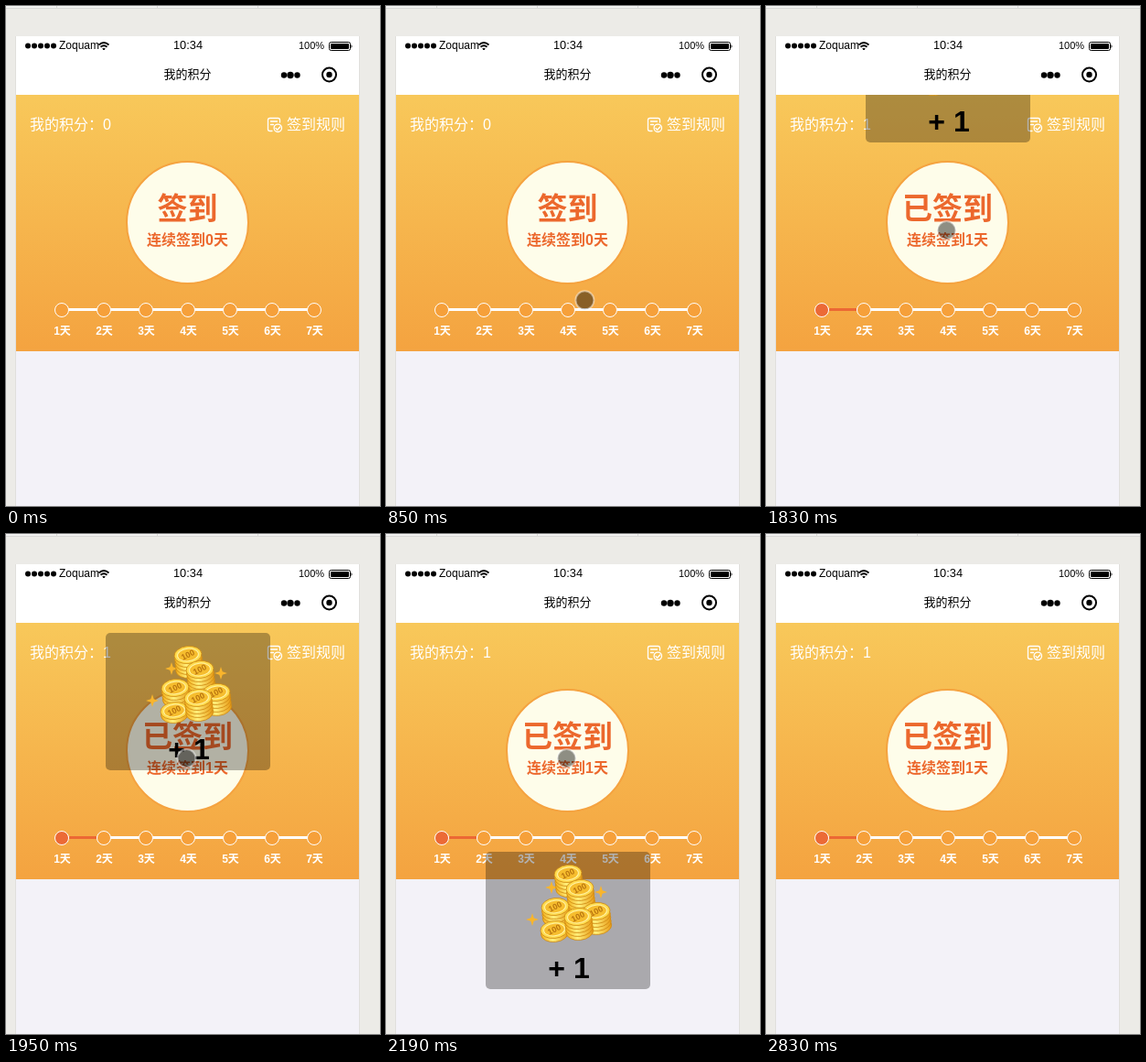
Animation, 409 px wide and 546 px high, one loop 4820 ms. Source, as an HTML page:

```html
<!DOCTYPE html>
<html lang="zh-CN">
<head>
<meta charset="utf-8">
<title>签到</title>
<style>
  html, body { margin: 0; width: 100%; height: 100%; overflow: hidden; background: #ecebe7; }
  svg { display: block; width: 100%; height: 100%; }
  text { font-family: "Liberation Sans", "Noto Sans CJK SC", "Noto Sans CJK", sans-serif; }
  .mid { text-anchor: middle; }
  .bold { font-weight: 700; }
  .accent { fill: #ec682d; }
  .line { fill: none; stroke: #fff; stroke-width: 1.3; stroke-linecap: round; }
</style>
</head>
<body>
<svg viewBox="0 0 409 546">
  <defs>
    <linearGradient id="sky" x2="0" y2="1">
      <stop stop-color="#f8c85a"/><stop offset="1" stop-color="#f4a340"/>
    </linearGradient>
    <linearGradient id="gold">
      <stop stop-color="#f3b01c"/><stop offset=".4" stop-color="#fff07c"/><stop offset="1" stop-color="#e89a14"/>
    </linearGradient>
    <clipPath id="page"><path d="M11 97h375v449H11z"/></clipPath>
  </defs>

  <path fill="#f3f3f2" d="M0 0h409v2H0z"/>
  <path fill="#d9d9d7" d="M0 2h409v1H0zM55 0h1v2h-1zM165 0h1v2h-1zM275 0h1v2h-1z"/>
  <path fill="#e0dfdc" d="M10 33h377v513H10z"/>
  <path fill="#f3f2f8" d="M11 33h375v513H11z"/>
  <path fill="#fff" d="M11 33h375v64H11z"/>
  <path fill="url(#sky)" d="M11 97h375v280H11z"/>

  <!-- status and title bars -->
  <g id="signal"></g>
  <text x="58" y="47" font-size="12">Zoquam</text>
  <g fill="none" stroke="#000" stroke-width="1.8">
    <path d="M101.5 42.5q5.5-5 11 0M103.5 44.7q3.5-3 7 0"/>
    <path d="M107 48l-1.3-1.3q1.3-1 2.6 0z" fill="#000" stroke-width=".8"/>
  </g>
  <text class="mid" x="199" y="47" font-size="12.8">10:34</text>
  <text x="320" y="47" font-size="11">100%</text>
  <rect x="353.5" y="39.5" width="23" height="9" rx="2" fill="none" stroke="#000"/>
  <rect x="355" y="41" width="20" height="6" rx="1"/>
  <path d="M377.5 42q2 2 0 4z"/>
  <text class="mid" x="198.5" y="79" font-size="13">我的积分</text>
  <circle cx="304" cy="75.5" r="3.2"/><circle cx="311" cy="75.5" r="3.7"/><circle cx="318.5" cy="75.5" r="3.2"/>
  <circle cx="353.5" cy="75" r="7.5" fill="none" stroke="#000" stroke-width="2"/>
  <circle cx="353.5" cy="75" r="3.2"/>

  <g fill="#fff" font-size="16">
    <text x="26" y="135">我的积分：<tspan class="count"></tspan></text>
    <text x="307" y="135">签到规则</text>
  </g>
  <path class="line" d="M291 136.5h-2.5a2 2 0 0 1-2-2v-10a2 2 0 0 1 2-2h9a2 2 0 0 1 2 2v2.5M289.5 126h7M289.5 129.5h3M295 133.5l1.7 1.7 3-3.2"/>
  <circle class="line" cx="297.3" cy="133.3" r="4.2"/>

  <circle cx="198.5" cy="236.5" r="66.5" fill="#fefdea" stroke="#f5a340" stroke-width="2"/>
  <g class="mid bold accent">
    <text id="label" x="198.5" y="232.5" font-size="33"></text>
    <text x="198.5" y="261" font-size="16">连续签到<tspan class="count"></tspan>天</text>
  </g>

  <path stroke="#fff" stroke-width="3" d="M61 331.5h276"/>
  <path id="done" stroke="#ec6834" stroke-width="3" d="M69 331.5h30"/>
  <g id="days"></g>

  <g clip-path="url(#page)">
    <g id="popup">
      <rect width="180" height="150" rx="5" opacity=".3"/>
      <g id="coins"></g>
      <text class="mid bold" x="91" y="138" font-size="32">+ 1</text>
    </g>
  </g>
  <circle id="cursor" r="10" fill="#000" fill-opacity=".44" stroke="#fff" stroke-opacity=".45" stroke-width="2"/>
</svg>

<script>
const LOOP = 4820, TICK = 60;
const $ = id => document.getElementById(id);
const clamp = (v, lo, hi) => Math.min(hi, Math.max(lo, v));
const show = (el, on) => el.setAttribute('visibility', on ? 'visible' : 'hidden');
const move = (el, x, y) => el.setAttribute('transform', `translate(${x} ${y})`);
const repeat = (n, fn) => Array.from({ length: n }, (_, i) => fn(i)).join('');

// Progress from a to b, advancing in ticks that land on b
function progress(t, a, b) {
  const held = b + TICK * Math.floor((t - b) / TICK);
  return clamp((held - a) / (b - a), 0, 1);
}

$('signal').innerHTML = repeat(5, i => `<circle cx="${24 + 7 * i}" cy="43.5" r="3"/>`);

$('days').innerHTML = repeat(7, i => {
  const x = 61 + 46 * i;
  return `<circle cx="${x}" cy="332" r="7.5" fill="#f6a03a" stroke="#fff"/>
    <text class="mid bold" x="${x + .5}" y="359" font-size="12" fill="#fff">${i + 1}天</text>`;
});

function stack(x, y, n) {
  const coin = (dy, fill) =>
    `<ellipse cy="${dy}" rx="15" ry="9.5" fill="${fill}" stroke="#cf8a12" stroke-width=".8"/>`;
  return `<g transform="translate(${x} ${y}) rotate(-6)">
    ${repeat(n, i => coin(4 * (n - i), 'url(#gold)'))}${coin(0, '#ffdc50')}
    <ellipse rx="11.5" ry="6.8" fill="#f6bd2e" stroke="#fff3a8"/>
    <text class="mid bold" y="3" font-size="9" fill="#b87410" transform="rotate(-20)">100</text></g>`;
}

const spark = (x, y) =>
  `<path transform="translate(${x} ${y})" fill="#f9b52c" d="M0-7L1.7-1.7 7 0 1.7 1.7 0 7-1.7 1.7-7 0-1.7-1.7z"/>`;

$('coins').innerHTML =
  [[72, 39], [126, 44], [51, 74]].map(s => spark(...s)).join('') +
  [[90, 24, 4], [103, 40, 5], [121, 65, 4], [76, 60, 3], [75, 85, 1], [101, 71, 4]].map(s => stack(...s)).join('');

function cursorAt(t) {
  if (t < 1310) {
    const rest = 1 - progress(t, 620, 1090);
    return [192 + 141 * rest ** 2.55, 252 + 259 * rest ** 1.96];
  }
  if (t < 2650) {
    const p = progress(t, 1250, 1430);
    return [192 + 5.5 * p, 252 - 7 * p];
  }
  const p = progress(t, 2590, 2770);
  return [197.5 + 110 * p, 245 + 240 * p ** 1.2];
}

function draw(t) {
  const signed = t >= 1710;
  $('label').textContent = signed ? '已签到' : '签到';
  document.querySelectorAll('.count').forEach(el => el.textContent = +signed);
  show($('done'), signed);
  $('days').firstElementChild.setAttribute('fill', signed ? '#ec6a36' : '#f6a03a');

  show($('popup'), signed && t < 2650);
  const p = progress(t, 1710, 2190);
  move($('popup'), 109, Math.round(-103 + 394 * p + 56 * p * p));

  show($('cursor'), t >= 620 && t < 2830);
  move($('cursor'), ...cursorAt(t));
}

function frame(now) {
  draw(now % LOOP);
  requestAnimationFrame(frame);
}
draw(0);
requestAnimationFrame(frame);
</script>
</body>
</html>
```
